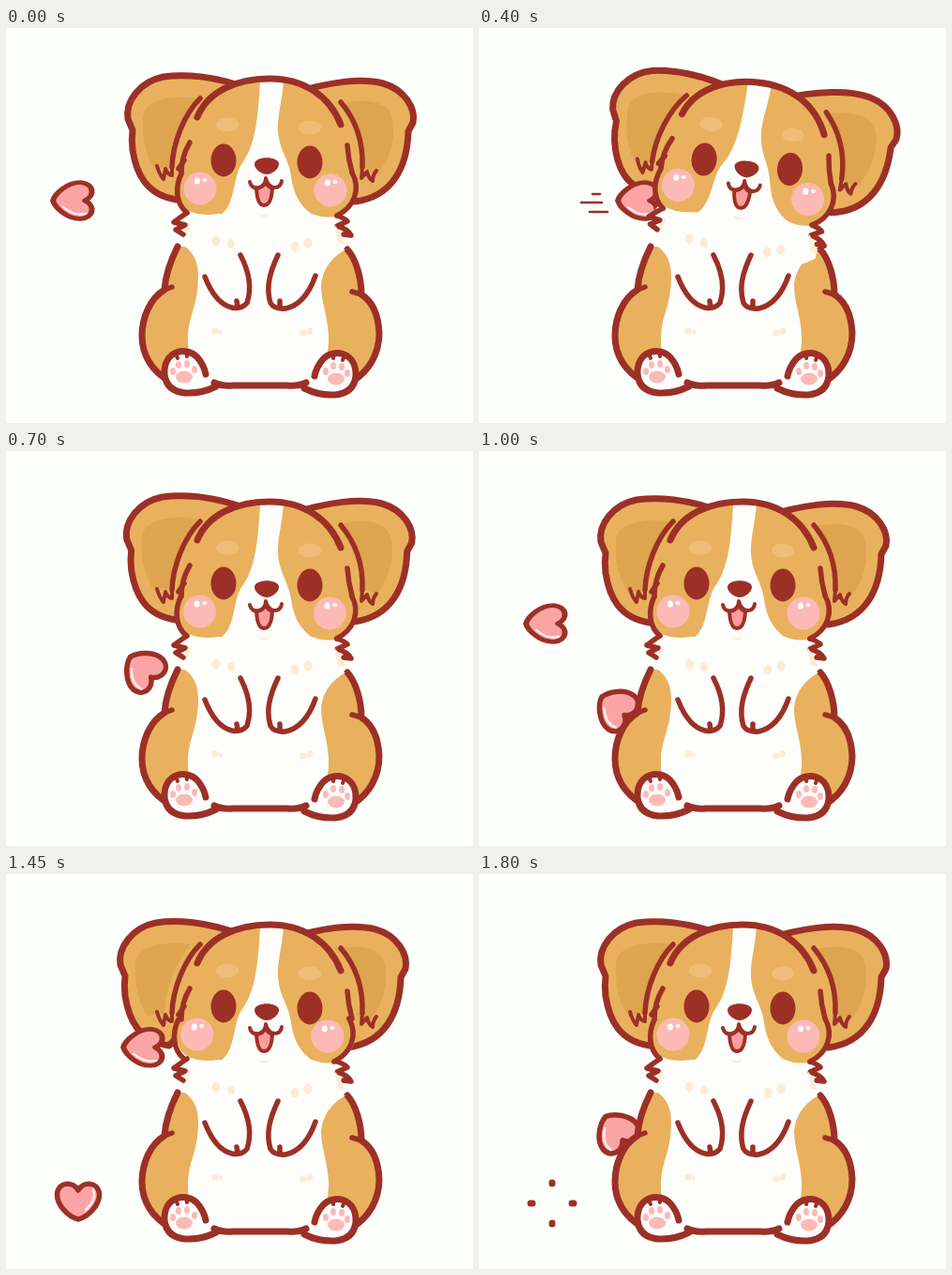
Animation, 498 px wide and 421 px high, one loop 1850 ms. Source, as an HTML page:

```html
<!DOCTYPE html>
<html lang="en">
<head>
<meta charset="utf-8">
<title>Puppy and hearts</title>
<style>
  html, body { margin: 0; width: 100%; height: 100%; overflow: hidden; background: #fdfffc; }
  svg { display: block; width: 100%; height: 100%; }
  .line { fill: none; stroke: #9c3026; stroke-width: 5.5; stroke-linecap: round; stroke-linejoin: round; }
  .thin { stroke-width: 4; }
  .thick { stroke-width: 7; }
  .fur { fill: #e9b15d; }
  .inner { fill: #dfa44f; }
  .white { fill: #fdfefc; }
  .dark { fill: #9c3026; }
  .pink { fill: #fcbab7; }
  .tongue { fill: #fb9d9d; }
  .cream { fill: #fdecd4; }
  .brow { fill: #efbd78; }
  .heart { fill: #fba4a6; }
  .shine { fill: none; stroke: #fff0ee; stroke-width: 2.5; stroke-linecap: round; }
</style>
</head>
<body>
<svg viewBox="0 0 498 421">
  <defs>
    <g id="heart">
      <path class="line heart" d="M0 19C-9 17-23 5-22.5-8C-21-21-6-22 0-12C6-22 21-21 22.5-8C23 5 9 17 0 19Z"/>
      <path class="shine" d="M16-13Q20-2 8 9"/>
    </g>
    <g id="paw">
      <path class="white" d="M-20-5C-20-24 2-28 13-16Q22-6 23 4L28 14Q4 28-17 17Z"/>
      <path class="line thick" d="M-22 2C-23-24 2-28 13-16Q20-8 22 2M-22 2Q-20 20 0 22Q17 23 33 15"/>
      <path class="line thin" d="M-10-20L-8-15M1-22L2-17"/>
      <ellipse class="pink" cx="-1" cy="5" rx="9" ry="6.5"/>
      <ellipse class="pink" cx="-13" cy="-1" rx="3" ry="4"/>
      <ellipse class="pink" cx="-7" cy="-8" rx="3" ry="4"/>
      <ellipse class="pink" cx="2" cy="-9" rx="3" ry="4"/>
      <ellipse class="pink" cx="10" cy="-3" rx="3" ry="4"/>
    </g>
    <g id="cheek">
      <circle class="pink" r="17.5"/>
      <ellipse class="white" cx="-3" cy="-8" rx="3" ry="3.5"/>
      <ellipse class="white" cx="5" cy="-9" rx="2.5" ry="2"/>
    </g>
  </defs>

  <g class="head">
    <g id="ears">
      <path class="line thick fur" d="M262 66C222 50 188 49 168 52C143 57 127 78 130 97L135 109C134 116 134 122 135 130C139 156 150 178 182 183L230 130Z"/>
      <path class="inner" d="M146 96C147 77 175 71 205 75C184 102 178 128 177 150Q166 148 160 152C149 137 145 118 146 96Z"/>
      <path class="line thick fur" d="M305 70C345 57 380 53 402 59C426 66 437 86 434 101L429 110C428 148 412 180 372 185L320 130Z"/>
      <path class="inner" d="M359 80C390 74 409 80 412 97C416 119 409 140 397 155L381 150C380 124 372 97 359 80Z"/>
    </g>
    <path class="fur" d="M200 84L207 76Q180 110 177 148L220 150ZM357 79Q382 110 380 148L330 150Z"/>
    <path class="line" d="M207 75C190 92 178 122 177 148M357 79C373 98 381 122 380 148"/>
    <path class="line thin" d="M161 147Q164 157 168 161L170 150Q173 157 177 157L177 148M380 148L379 160L385 153Q387 161 391 163Q391 157 395 152"/>
  </g>

  <path id="speed" class="line" style="stroke-width:2.5" d="M121 177H129M109 186H131M118 196H137"/>
  <use href="#heart" class="flying"/>
  <use href="#heart" class="flying"/>
  <path id="pop" class="line" style="stroke-width:7"/>

  <g id="body">
    <path class="line thick fur" d="M183 233C176 247 170 263 169 279C154 288 145 308 145 328C145 349 156 366 174 376H370C387 366 398 347 398 325C397 305 390 291 379 284C379 266 373 246 364 236"/>
    <path class="white" d="M188 231C204 241 207 256 204 280C202 299 194 310 194 332Q194 360 210 381H330Q345 355 344 328C343 306 336 292 336 274Q338 250 362 236Z"/>
    <path class="line" d="M169 279L177 276M379 284L369 281"/>
    <g class="cream">
      <ellipse cx="223" cy="323" rx="4" ry="3.5"/><ellipse cx="229" cy="324" rx="2" ry="2.5"/>
      <ellipse cx="317" cy="325" rx="4" ry="3.5"/><ellipse cx="324" cy="323" rx="3" ry="4"/>
    </g>
    <use href="#paw" x="191" y="367"/>
    <use href="#paw" transform="translate(351 369) scale(-1 1)"/>
    <path class="line thick" d="M222 378Q230 382 242 381H300Q312 382 320 378"/>
  </g>

  <g class="head">
    <path class="white" d="M191 190L181 205L190 210L182 215L189 221L189 231Q205 246 235 248H315Q345 246 360 235L360 221L366 220L355 211L364 206L352 192Z"/>
    <path class="fur" d="M204 95C215 68 245 54 281 54C317 54 346 72 358 104Q367 125 371 152C379 172 370 194 350 201Q338 203 326 198H226Q206 201 193 194C181 185 179 172 186 152Z"/>
    <path class="white" d="M271 57H296C294 80 289 95 290 110C292 132 301 138 304 158C307 180 316 193 332 202H224C245 193 241 164 250 147C262 130 268 115 271 57Z"/>
    <path class="line thick" d="M204 95C215 68 245 54 281 54C317 54 345 72 357 103"/>
    <path class="line" d="M196 122Q187 137 187 155M190 141L184 150M364 125Q365 140 369 154"/>
    <g id="cheeks">
      <path class="line" d="M187 155C180 170 181 187 193 197M369 154C379 172 371 191 353 200"/>
      <use href="#cheek" x="207" y="171"/>
      <use href="#cheek" x="346" y="173"/>
    </g>
    <path class="line" d="M193 197Q184 203 179 207L191 210L181 215L189 220M353 200Q362 203 364 206L353 211Q364 214 368 221L360 220"/>
    <ellipse class="brow" cx="236" cy="103" rx="12" ry="7.5"/>
    <ellipse class="brow" cx="324" cy="106" rx="12" ry="7.5"/>
    <ellipse class="dark" cx="232" cy="141" rx="13.5" ry="17.5"/>
    <ellipse class="dark" cx="324" cy="143" rx="13.5" ry="17.5"/>
    <path class="line thin tongue" d="M267 171Q268 189 275 189Q283 189 284 171Q278 169 277 163Q275 170 267 171Z"/>
    <path class="line thin" d="M260 164Q262 172 270 170Q277 168 277 160Q279 169 286 170Q293 170 294 163"/>
    <path class="dark" d="M265 145C265 136 291 136 291 145C291 151 283 156 278 156C273 156 265 151 265 145Z"/>
    <g class="cream">
      <path d="M268 198Q275 200 281 198Q276 205 268 198Z"/>
      <ellipse cx="224" cy="227" rx="4.5" ry="5.5"/><ellipse cx="240" cy="230" rx="4" ry="5"/>
      <ellipse cx="308" cy="233" rx="4.5" ry="5.5"/><ellipse cx="322" cy="229" rx="4.5" ry="5.5"/>
      <path d="M191 214L198 207L193 222ZM355 216L350 209L354 229L362 230Z"/>
    </g>
  </g>

  <path class="line" d="M250 242C260 261 262 278 257 293M212 265C219 283 228 295 241 298Q251 300 257 293M246 291L247 297M290 242C281 261 277 277 282 293M330 264C323 284 312 296 298 299Q286 300 282 293M292 291V297"/>
</svg>
<script>
const LOOP = 1850, SECOND_START = 825, HIT = 365, POP = 1680;

const get = id => document.getElementById(id);
const heads = document.querySelectorAll('.head'), hearts = document.querySelectorAll('.flying');
const show = (node, visible) => node.setAttribute('visibility', visible ? 'visible' : 'hidden');
const place = (node, transform) => node.setAttribute('transform', transform);

const ramp = (time, from, to) => Math.min(1, Math.max(0, (time - from) / (to - from)));
const easeOut = p => 1 - (1 - p) ** 2;
const smooth = p => p * p * (3 - 2 * p);
const bump = p => Math.sin(Math.PI * p);

// Fly in, press the cheek, get pushed back, drop to the hip, roll to the ground.
function drawHeart(node, time) {
  const x = 71 + 98 * ramp(time, 200, HIT) + 9 * bump(ramp(time, 410, 500))
    - 23 * ramp(time, 480, 625) - 69 * easeOut(ramp(time, 1000, 1400));
  const y = 184 + 90 * easeOut(ramp(time, 625, 860)) + 75 * ramp(time, 1000, 1400) ** 2;
  const turn = 90 + 55 * ramp(time, 625, 720) - 145 * easeOut(ramp(time, 975, 1420));
  const stretch = 0.1 * (1 - ramp(time, 625, 700));
  const size = ramp(time, -100, 0);
  place(node, `translate(${x} ${y}) rotate(${turn}) scale(${size * (1 - 1.4 * stretch)} ${size * (1 + stretch)})`);
  show(node, size > 0 && time < POP);
}

function drawHead(time) {
  const tilt = 5.3 * ramp(time, 330, HIT) + 5.2 * ramp(time, 410, 455) - 10.5 * smooth(ramp(time, 470, 625));
  const push = Math.min(1, tilt / 5.3);
  const lag = -8 * bump(ramp(time, 540, 710));
  const lift = -3 * bump(ramp(time, 625, 775));
  for (const node of heads) place(node, `translate(${2 * push} ${3 * push}) rotate(${tilt} 278 205)`);
  place(get('ears'), `translate(${lag} ${lift})`);
  place(get('cheeks'), `translate(${lag * 0.4} 0)`);
  show(get('speed'), time >= HIT - 20 && time < 430);
}

function drawPop(time) {
  const inner = 12 + 9 * ramp(time, POP, POP + 100);
  const dots = [0, 1, 2, 3].map(i => {
    const c = Math.cos(i * Math.PI / 2), s = Math.sin(i * Math.PI / 2);
    return `M${78 + c * inner} ${351 + s * inner}L${78 + c * 23} ${351 + s * 22}`;
  });
  get('pop').setAttribute('d', dots.join(''));
  show(get('pop'), time >= POP);
}

function draw(time) {
  drawHead(time < SECOND_START ? time : time - SECOND_START);
  hearts.forEach((node, i) => drawHeart(node, time - i * SECOND_START));
  drawPop(time);
}

const start = performance.now();
function tick() {
  draw((performance.now() - start) % LOOP);
  requestAnimationFrame(tick);
}
tick();
</script>
</body>
</html>
```
